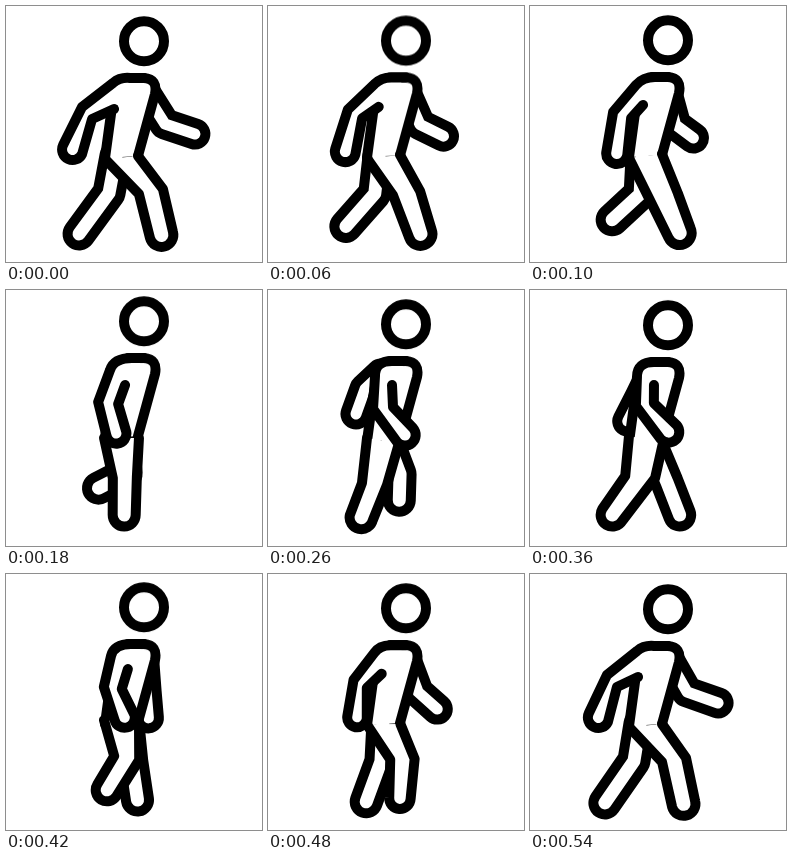
Recreate the animation shown at these times as an HTML page without scripts. Size 256 by 256 pixels, loop 560 ms.

```html
<!DOCTYPE html>
<html lang="en">
<head>
<meta charset="utf-8">
<title>Walking figure</title>
<style>
  html, body { margin: 0; width: 100%; height: 100%; overflow: hidden; background: #fff; }
  svg { display: block; width: 100vw; height: 100vh; }

  path, circle { fill: #fff; stroke: #000; stroke-width: 10; stroke-linecap: round; stroke-linejoin: round; }

  /* A far limb is a wide black line with a narrow white one on top */
  .tube { fill: none; }
  .tube.leg { stroke-width: 33; }
  .tube.arm { stroke-width: 31; }
  .tube.core { stroke: #fff; }
  .leg.core { stroke-width: 13; }
  .arm.core { stroke-width: 11; }

  .trunk, .near-leg, .near-arm, .tube { animation: 560ms linear infinite; }
  .trunk { animation-name: bob; }
  .near-leg { animation-name: near-leg; }
  .near-arm { animation-name: near-arm; }
  .tube.leg { animation-name: far-leg; }
  .tube.arm { animation-name: far-arm; }

  @keyframes bob {
    0%, 55.357%, 64.286%, 96.429%, 100% { transform: none; }
    17.857%, 46.429% { transform: translateY(-1px); }
    32.143% { transform: translateY(-4px); }
    75% { transform: translateY(-2px); }
  }

  /* hip, knee, foot */
  @keyframes far-leg {
    0%      { d: path("M110 150 L103 187 L73 228"); animation-timing-function: cubic-bezier(.4, .2, .8, .8); }
    17.857% { d: path("M112 150 L110 188 L82 214"); }
    32.143% { d: path("M117 150 L120 184 L92 198"); }
    46.429% { d: path("M120 152 L132 184 L131 210"); }
    55.357% { d: path("M120 152 L136 187 L145 221"); }
    64.286% { d: path("M120 152 L137 192 L150 225"); }
    75%     { d: path("M122 150 L126 188 L132 226"); animation-timing-function: cubic-bezier(.2, .2, .6, .8); }
    96.429% { d: path("M110 150 L104 187 L75 229"); }
    100%    { d: path("M110 150 L103 187 L73 228"); }
  }

  /* shoulder, elbow, hand */
  @keyframes far-arm {
    0%      { d: path("M140 88 L159 118 L189 128"); animation-timing-function: cubic-bezier(.4, .2, .8, .8); }
    17.857% { d: path("M138 90 L146 119 L164 132"); }
    32.143% { d: path("M124 86 L118 112 L119 138"); }
    46.429% { d: path("M113 84 L97 99 L88 124"); }
    55.357% { d: path("M114 84 L97 99 L86 125"); }
    64.286% { d: path("M120 86 L110 106 L97 131"); }
    75%     { d: path("M138 90 L140 118 L142 144"); animation-timing-function: cubic-bezier(.2, .2, .6, .8); }
    96.429% { d: path("M140 88 L157 118 L188 129"); }
    100%    { d: path("M140 88 L159 118 L189 128"); }
  }

  /* down the front, round the foot, up the back */
  @keyframes near-leg {
    0%      { d: path("M132 150 L157 183 L167 226 A9 9 0 0 1 144 232 L133 188 L99 153"); animation-timing-function: cubic-bezier(.4, .2, .8, .8); }
    17.857% { d: path("M132 148 L148 187 L161 222 A9 9 0 0 1 139 232 L118 190 L99 152"); }
    32.143% { d: path("M133 148 L131 187 L130 225 A9 9 0 0 1 107 225 L107 188 L98 148"); }
    46.429% { d: path("M131 153 L119 195 L105 230 A9 9 0 0 1 82 225 L94 193 L99 148"); }
    55.357% { d: path("M132 153 L121 191 L97 231 A9 9 0 0 1 76 221 L93 189 L99 147"); }
    64.286% { d: path("M133 153 L125 188 L92 231 A9 9 0 0 1 72 219 L95 186 L99 146"); }
    75%     { d: path("M133 150 L133 186 L110 222 A9 9 0 0 1 91 210 L108 182 L98 146"); animation-timing-function: cubic-bezier(.2, .2, .6, .8); }
    96.429% { d: path("M132 150 L156 184 L165 227 A9 9 0 0 1 142 233 L132 188 L99 153"); }
    100%    { d: path("M132 150 L157 183 L167 226 A9 9 0 0 1 144 232 L133 188 L99 153"); }
  }

  /* over the shoulder, down to the hand, back up to the armpit */
  @keyframes near-arm {
    0%      { d: path("M138 72 L124 72 Q114 71 107 77 L76 101 L57 139 A9 9 0 0 0 76 148 L86 113 L108 103"); animation-timing-function: cubic-bezier(.4, .2, .8, .8); }
    17.857% { d: path("M138 71 L125 71 Q113 71 106 79 L83 106 L76 146 A9 9 0 0 0 97 149 L101 112 L113 99"); }
    32.143% { d: path("M138 68 L126 68 Q108 68 104 80 L92 112 L100 145 A9 9 0 0 0 120 142 L112 114 L119 95"); }
    46.429% { d: path("M138 71 L124 71 Q107 71 107 86 L105 119 L129 152 A9 9 0 0 0 145 138 L125 117 L124 95"); }
    55.357% { d: path("M138 72 L124 72 Q107 72 107 87 L106 117 L133 149 A9 9 0 0 0 148 135 L125 114 L124 95"); }
    64.286% { d: path("M138 72 L124 72 Q107 72 107 87 L106 116 L131 149 A9 9 0 0 0 147 135 L124 113 L124 95"); }
    75%     { d: path("M138 70 L125 70 Q108 70 105 82 L98 113 L109 146 A9 9 0 0 0 129 141 L116 115 L122 95"); animation-timing-function: cubic-bezier(.2, .2, .6, .8); }
    96.429% { d: path("M138 72 L124 72 Q114 71 107 77 L77 101 L59 139 A9 9 0 0 0 78 148 L87 113 L108 103"); }
    100%    { d: path("M138 72 L124 72 Q114 71 107 77 L76 101 L57 139 A9 9 0 0 0 76 148 L86 113 L108 103"); }
  }
</style>
</head>
<body>
<svg viewBox="0 0 256 256">
  <path class="tube arm"/>
  <path class="tube arm core"/>
  <path class="tube leg"/>
  <path class="tube leg core"/>
  <g class="trunk">
    <circle cx="138" cy="35.3" r="20"/>
    <path d="M99 152 L105 108 L110 82 L122 72 H138 Q152 73 149 88 L132 150"/>
  </g>
  <path class="near-leg"/>
  <path class="near-arm"/>
</svg>
</body>
</html>
```
